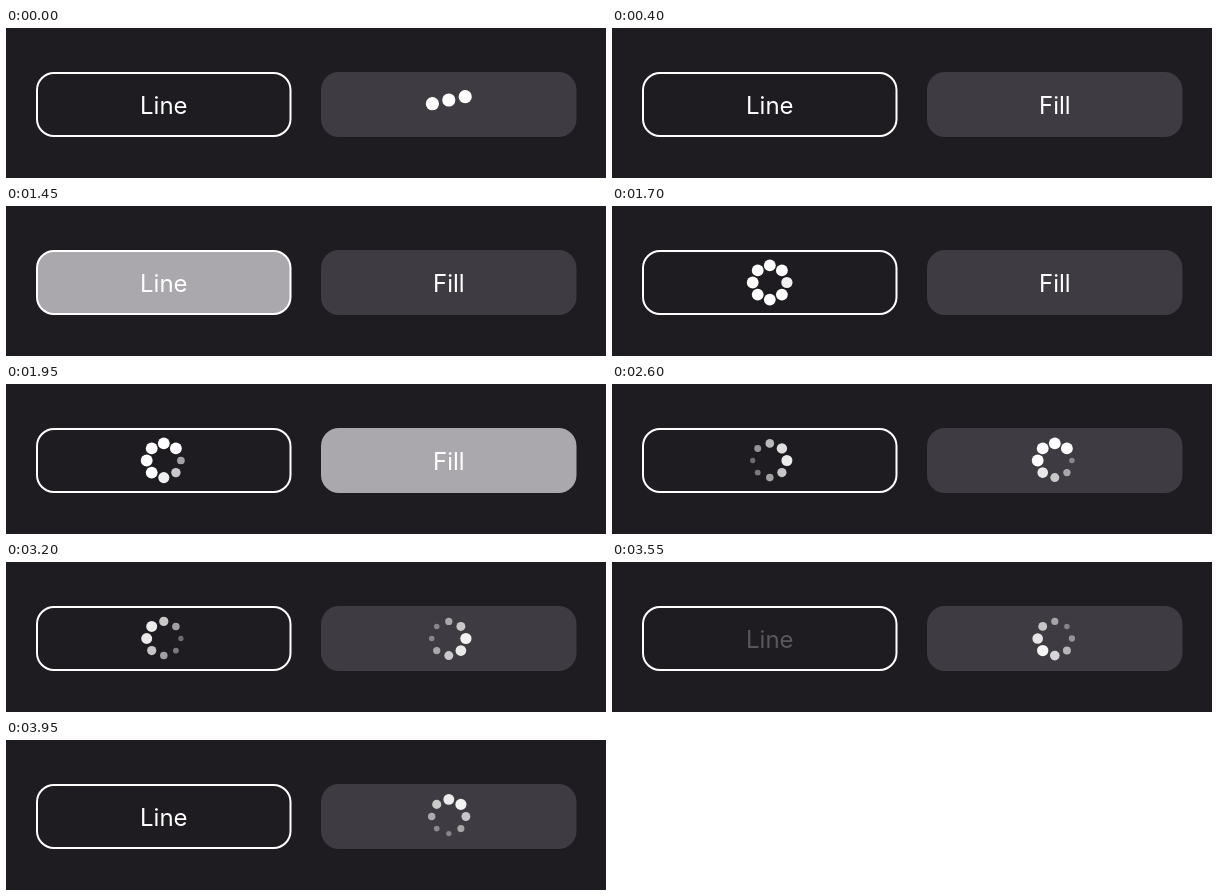
These frames come from a looping animation (600x150 px, 4000 ms). An HTML page with a canvas:

```html
<!DOCTYPE html>
<html lang="en">
<head>
<meta charset="utf-8">
<title>Loading buttons</title>
<style>
  html, body { margin: 0; width: 100%; height: 100%; overflow: hidden; background: #1e1c20; }
  canvas { display: block; }
</style>
</head>
<body>
<canvas width="600" height="150"></canvas>
<script>
const ctx = document.querySelector('canvas').getContext('2d');
const LOOP = 4000, CENTER_Y = 76.5, FADE = 200;

const clamp = v => Math.min(1, Math.max(0, v));
const smooth = s => s * s * (3 - 2 * s);
const mix = (a, b, s) => a + (b - a) * s;
const fadeIn = (t, start) => clamp((t - start) / FADE) ** 1.7;
const fadeOut = (t, start) => (1 - clamp((t - start) / FADE)) ** 1.7;

function box(x, y, w, h, r) {
  ctx.beginPath();
  ctx.roundRect(x, y, w, h, r);
}

function dot(x, y, r, alpha = 1) {
  ctx.fillStyle = `rgba(255,255,255,${alpha})`;
  ctx.beginPath();
  ctx.arc(x, y, r, 0, 2 * Math.PI);
  ctx.fill();
}

function label(text, x, alpha) {
  ctx.font = '24px Inter, sans-serif';
  ctx.textAlign = 'center';
  ctx.fillStyle = `rgba(255,255,255,${alpha})`;
  ctx.fillText(text, x, 85.5);
}

// Ring of dots that shrink and fade in turn, each waiting for its first pulse.
function spinner(cx, seconds) {
  for (let i = 0; i < 8; i++) {
    const phase = Math.max(0, seconds - 0.12 * i) % 1;
    const dip = 1 - Math.abs(1 - 2 * phase);
    const angle = i * Math.PI / 4;
    dot(cx + 17.1 * Math.cos(angle), CENTER_Y + 17.1 * Math.sin(angle),
        5.9 * mix(1, 0.4, dip), mix(1, 0.3, dip));
  }
}

// Three dots following each other down, up and back to rest.
function bouncer(cx, seconds) {
  const keys = [0, 1, -1, 0], times = [0, 0.33, 0.66, 1];
  for (let i = 0; i < 3; i++) {
    const p = (seconds + 0.56 - 0.07 * i) / 0.6 % 1;
    const k = p < times[1] ? 0 : p < times[2] ? 1 : 2;
    const s = smooth((p - times[k]) / (times[k + 1] - times[k]));
    dot(cx + (i - 1) * 16.4, CENTER_Y + 8.2 * mix(keys[k], keys[k + 1], s), 6.6);
  }
}

function lineButton(t) {
  const press = 1450, spin = 1660, done = 3460, cx = 157.8;
  box(31, 45, 253.5, 63, 17);
  if (t >= press && t < press + 50) {
    ctx.fillStyle = '#aaa8ac';
    ctx.fill();
  }
  ctx.strokeStyle = '#fff';
  ctx.lineWidth = 2;
  ctx.stroke();
  if (t >= spin && t < done) spinner(cx, (t - spin) / 1000);
  label('Line', cx, t < done ? fadeOut(t, spin - FADE) : fadeIn(t, done));
}

function fillButton(t) {
  const done = 190, press = 1950, spin = 2160, cx = 442.8;
  box(315, 44, 255.5, 65, 18);
  ctx.fillStyle = t >= press && t < press + 50 ? '#aaa8ac' : '#3e3c42';
  ctx.fill();
  if (t < done) bouncer(cx, t / 1000);
  if (t >= spin) spinner(cx, (t - spin) / 1000);
  label('Fill', cx, t < press ? fadeIn(t, done) : fadeOut(t, spin - FADE));
}

function draw() {
  const t = performance.now() % LOOP;
  ctx.fillStyle = '#1e1c20';
  ctx.fillRect(0, 0, 600, 150);
  lineButton(t);
  fillButton(t);
  requestAnimationFrame(draw);
}
draw();
</script>
</body>
</html>
```
